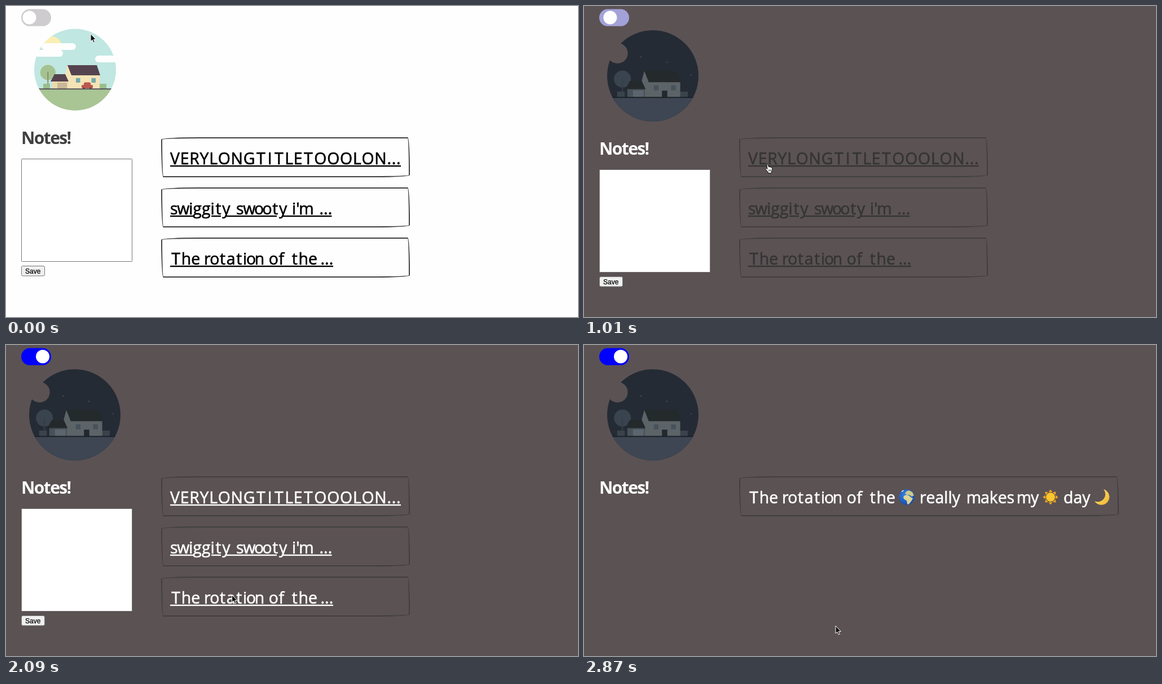
Recreate the animation shown at these times as an HTML page. Size 1014 px wide and 552 px high, loop 3580 ms.

```html
<!DOCTYPE html>
<html lang="en">
<head>
<meta charset="utf-8">
<title>Notes</title>
<style>
  html, body { margin: 0; width: 100%; height: 100%; overflow: hidden; }
  body { position: relative; background: #fefefe; }
  body.night { background: #5b5254; }
  svg { position: absolute; left: 0; top: 0; }
  .card {
    position: absolute; left: 275px; width: 441px; height: 71px; box-sizing: border-box;
    border: 2px solid #41403e;
    border-radius: 255px 15px 225px 15px / 15px 225px 15px 255px;
  }
  .wide { width: 673px; }
  .hand-text {
    font: 28.4px "Comic Sans MS", "Open Sans", "Noto Sans", sans-serif;
    font-kerning: none; font-variant-ligatures: none;
  }
  .hand-text text { stroke: currentColor; stroke-width: .6px; }
  .title { font-size: 30px; font-weight: 700; letter-spacing: -1.6px; }
  .save { font: 12px "Liberation Sans", Arial, sans-serif; stroke: #000; stroke-width: .25px; }
</style>
</head>
<body>
<div id="cards">
  <div class="card" style="top:233px"></div>
  <div class="card" style="top:322px"></div>
  <div class="card" style="top:411px"></div>
</div>
<div id="wideCard" class="card wide" style="top:233px"></div>

<svg width="1014" height="552" viewBox="0 0 1014 552">
  <defs>
    <clipPath id="disc"><circle cx="122.5" cy="113" r="72.5"/></clipPath>
    <clipPath id="earth"><circle cx="572" cy="270" r="13.7"/></clipPath>
    <radialGradient id="sea" cx=".4" cy=".35" r=".7">
      <stop offset="0" stop-color="#3580e6"/><stop offset="1" stop-color="#174aa8"/>
    </radialGradient>
    <linearGradient id="moonFill" x1="0" y1="0" x2="1" y2="1">
      <stop offset="0" stop-color="#ffe27a"/><stop offset="1" stop-color="#f2b52c"/>
    </linearGradient>
  </defs>

  <rect id="ring" x="25.3" y="4" width="56.4" height="33.4" rx="16.7" fill="none" stroke="#337fb8" stroke-width="3"/>
  <rect id="track" x="27" y="5.5" width="53" height="30.3" rx="15.1"/>
  <circle id="knob" cy="20.6" r="12" fill="#fff"/>

  <g id="day"></g>
  <g id="nightScene" transform="translate(122 124) scale(1.117) translate(-122.5 -113)"></g>

  <text id="title" class="hand-text title" x="27">Notes!</text>

  <g id="form">
    <rect x="27.5" y="271.5" width="196" height="182" rx="1" fill="#fff" stroke="#767676"/>
    <rect x="27.5" y="461.5" width="41" height="17.5" rx="2.5" fill="#efefef" stroke="#767676"/>
    <text class="save" x="34" y="474.5">Save</text>
  </g>

  <g id="list" class="hand-text" fill="currentColor"></g>

  <g id="note" class="hand-text" color="#fff">
    <g id="noteText" fill="currentColor"></g>
    <circle cx="572" cy="270" r="13.7" fill="url(#sea)"/>
    <g clip-path="url(#earth)">
      <path d="M567 268l4-2 5 1 3 3 4 2-2 4-3 4-3 3-2-1-1-6-4-2-2-3z" fill="#dcd596"/>
      <path d="M569 264l2-4 5-2 6 3 3 6-4 2-4-3-4 0z" fill="#c9c98a"/>
      <path d="M562 259l4-2 1 2-4 2z" fill="#e9ecea"/>
    </g>
    <g id="rays" fill="#f7a81c"></g>
    <circle cx="827" cy="270" r="8" fill="#fdc52d"/>
    <path d="M921 256A14.2 14.2 0 1 1 905 277A13.5 13.5 0 0 0 921 256Z" fill="url(#moonFill)"/>
  </g>

  <g id="cursor" stroke-linejoin="round">
    <path id="arrow" d="M0 0V13.4L3 10.7L5.2 15.6L7.4 14.6L5.3 9.9H9.4Z" fill="#111" stroke="#fff"/>
    <g id="hand">
      <path d="M3 1.6Q4.2.2 5.3 1.8L6.4 5.8Q7.6 4.9 8.5 6Q9.8 5.2 10.7 6.6Q12.6 6.2 12.8 8.2Q13.2 12 11.4 14V16.5H5.2V14.6Q3 12.2.9 9.5Q.4 7.6 2.3 8L4.1 9.5Z" fill="#fff" stroke="#111"/>
      <path d="M6.6 10.2V13.6M8.6 10.2V13.6M10.5 10.2V13.6" stroke="#111" stroke-width=".8"/>
    </g>
  </g>
</svg>

<script>
const $ = id => document.getElementById(id);
const LOOP = 3580, FADE_AT = 930, FADE = 500, NIGHT_AT = 1010, OPEN_AT = 2170;

// Each pose holds until the next: time, x, y, cursor shape.
const poses = [
  [0, 150, 49.5, "arrow"], [70, 100, 42, "arrow"], [150, 67, 33, "hand"],
  [320, 58, 28, "hand"], [390, 52, 24, "hand"], [470, 49, 23, "hand"],
  [620, 50, 22.5, "hand"], [930, 322, 280, "hand"], [1010, 321, 280, "hand"],
  [1080, 334, 308, "hand"], [1160, 351, 345, "hand"], [1240, 367, 378, "hand"],
  [1310, 379, 401, "hand"], [1390, 386, 414, "hand"], [1470, 391, 430, "hand"],
  [1620, 393, 436, "hand"], [1690, 395, 441, "hand"], [1770, 396, 445, "hand"],
  [2020, 400.5, 443.5, "arrow"], [2240, 410, 459, "arrow"], [2320, 420, 474.5, "arrow"],
  [2490, 424.5, 480.5, "arrow"], [2640, 434, 490, "arrow"], [2720, 441.5, 498, "arrow"],
  [2870, 446, 498.5, "arrow"]
];

const box = (x, y, w, h, fill, rx = 0) =>
  `<rect x="${x}" y="${y}" width="${w}" height="${h}" rx="${rx}" fill="${fill}"/>`;
const dot = (x, y, r, fill) => `<circle cx="${x}" cy="${y}" r="${r}" fill="${fill}"/>`;
const shape = (points, fill) => `<polygon points="${points}" fill="${fill}"/>`;

function scene(c, behind, front) {
  return `<g clip-path="url(#disc)">` +
    box(50, 40, 146, 146, c.sky) + behind +
    dot(74.3, 118, 13.5, c.tree) + box(73.3, 117, 2, 30, c.trunk) +
    box(66, 138, 12, 9, c.bush) + box(165, 138, 13, 9, c.bush) +
    shape("109,105.5 104,124 104,147 166,147 166,121 117,121", c.wall) +
    shape("109,105 161,105 167,123 116,123", c.roof) +
    box(82, 132, 28, 15, c.shed) + box(91, 136, 17, 11, c.gate) +
    shape("86,121 105,121 111,134 79,134", c.roof) +
    box(124, 128, 7.5, 8, c.glass) + box(151.5, 128, 7.5, 8, c.glass) +
    front +
    box(50, 147, 146, 40, c.ground) + box(50, 146.4, 146, 1.8, c.line) + `</g>`;
}

$("day").innerHTML = scene(
  { sky: "#c0e7e1", tree: "#a4c391", trunk: "#8a8a70", bush: "#9bbc8c", wall: "#f4e3b6",
    roof: "#55434f", shed: "#ecd9ad", gate: "#c9b897", glass: "#74a9ac", ground: "#a9c594", line: "#4c4750" },
  dot(82, 70, 16, "#fbeeb4"),
  box(138, 135.5, 12, 7, "#b9574f", 2) + box(134, 140, 20, 6, "#b9574f", 2) +
  dot(138, 146, 1.6, "#553c42") + dot(150, 146, 1.6, "#553c42")
) + box(63, 66, 61, 12, "#fefefe", 6) + box(46, 78, 55, 12, "#fefefe", 6) + box(158, 88, 44, 12, "#fefefe", 6);

$("nightScene").innerHTML = scene(
  { sky: "#242b34", tree: "#39444f", trunk: "#343e48", bush: "#3a434b", wall: "#5d6468",
    roof: "#24292c", shed: "#495158", gate: "#5b656d", glass: "#47525b", ground: "#3d4652", line: "#1b2229" },
  [[104, 83], [145, 91.5], [183.5, 111.5]].map(([x, y]) => dot(x, y, .7, "#7b848e")).join(""),
  box(137, 136.5, 8.5, 10.5, "#22292f")
) + dot(66.5, 77, 16.3, "#5b5254");

// Handwritten rhythm: narrow letters get more room, round and wide ones less.
const room = ch => "ftTI".includes(ch) ? 3.5 : "mwno".includes(ch) ? -2.5 : 0;

function word(x, text) {
  const shifts = [...text].map((ch, i) => (room(ch) + (i ? room(text[i - 1]) : 0)) / 2);
  return `<tspan x="${x}" dx="${shifts.join(" ")}">${text}</tspan>`;
}
const line = (y, words, spacing = 0) => `<text y="${y}" letter-spacing="${spacing}">` +
  words.map(([x, text]) => word(x, text)).join("") + `</text>`;
const underline = (y, spans) =>
  spans.map(([from, to]) => box(from, y, to - from, 2.4, "currentColor")).join("");

const opening = [[291.5, "The"], [351, "rotation"], [467, "of"], [505, "the"]];
$("list").innerHTML =
  line(280.5, [[291, "VERYLONGTITLETOOOLON..."]], .75) + underline(282.8, [[291, 700]]) +
  line(369.5, [[291, "swiggity"], [408, "swooty"], [507, "i'm"], [555.5, "..."]]) +
  underline(371.8, [[291, 332], [364, 381], [390, 480], [490, 577.5]]) +
  line(458.5, [...opening, [557.5, "..."]]) + underline(460.8, [[291, 580]]);

$("noteText").innerHTML = line(280.5,
  [...opening, [595, "really"], [679, "makes"], [768, "my"], [850, "day"]]);

$("rays").innerHTML = Array.from({ length: 8 }, (_, i) =>
  `<path d="M823.6 261L827 256.4L830.4 261Z" transform="rotate(${i * 45} 827 270)"/>`).join("");

// The standard CSS "ease" curve, solved by bisection.
function ease(x) {
  if (x <= 0) return 0;
  if (x >= 1) return 1;
  const curve = (u, a, b) => 3 * u * (1 - u) ** 2 * a + 3 * u * u * (1 - u) * b + u ** 3;
  let lo = 0, hi = 1;
  for (let i = 0; i < 24; i++) {
    const mid = (lo + hi) / 2;
    if (curve(mid, .25, .25) < x) lo = mid; else hi = mid;
  }
  return curve(lo, .1, 1);
}

const mix = (a, b, p) => `rgb(${a.map((v, i) => Math.round(v + (b[i] - v) * p)).join(",")})`;
const show = (id, on) => { $(id).style.display = on ? "" : "none"; };

function draw(ms) {
  const [held, x, y, kind] = poses.findLast(pose => pose[0] <= ms);
  const p = ease((held - FADE_AT) / FADE);
  const night = ms >= NIGHT_AT, open = ms >= OPEN_AT;

  document.body.className = night ? "night" : "";
  show("day", !night);
  show("nightScene", night);
  show("ring", ms >= 1080 && ms < 2020);
  for (const id of ["cards", "list", "form"]) show(id, !open);
  for (const id of ["wideCard", "note"]) show(id, open);

  $("track").setAttribute("fill", mix([206, 204, 206], [0, 0, 255], p));
  $("knob").setAttribute("cx", 41.5 + 23.5 * p);
  $("list").style.color = mix([0, 0, 0], [255, 255, 255], p);
  $("title").setAttribute("y", night ? 264 : 245);
  $("title").setAttribute("fill", night ? "#fff" : "#404040");
  $("form").setAttribute("transform", `translate(0 ${night ? 19 : 0})`);

  $("cursor").setAttribute("transform", `translate(${x} ${y})`);
  show("arrow", kind === "arrow");
  show("hand", kind === "hand");
}

const start = performance.now();
function tick() {
  draw((performance.now() - start) % LOOP);
  requestAnimationFrame(tick);
}
tick();
</script>
</body>
</html>
```
